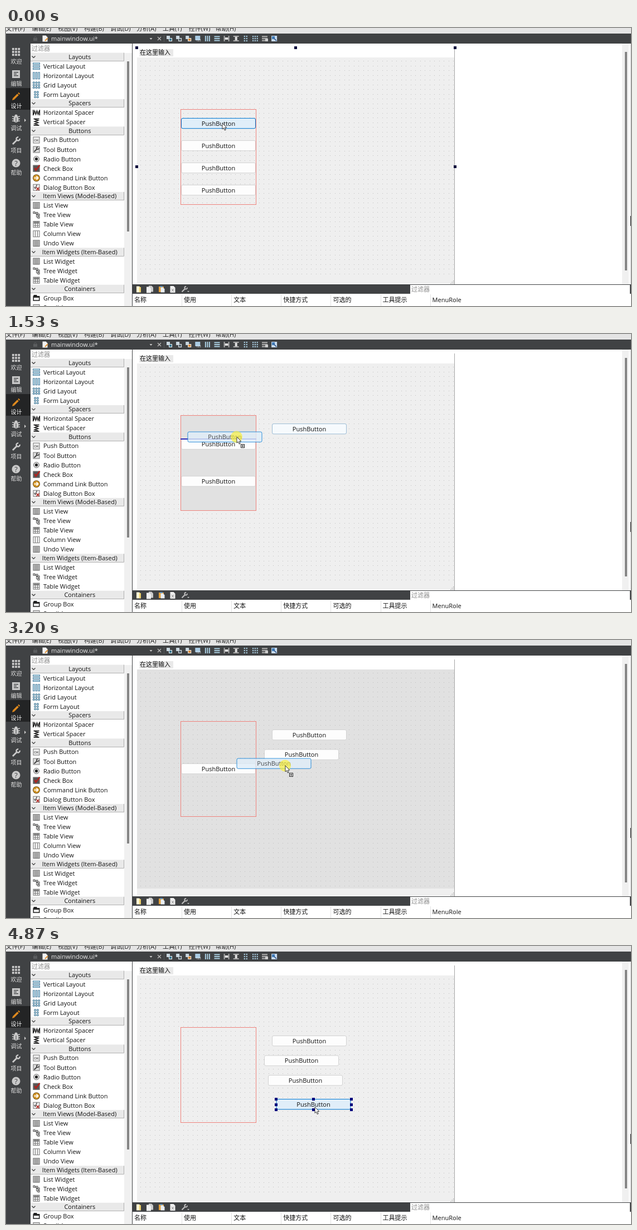
Animation of 1121 by 500 pixels, one loop 5.4 s. Source, as an HTML page with a canvas:

```html
<!DOCTYPE html>
<html lang="zh">
<head>
<meta charset="utf-8">
<title>Form designer</title>
<style>
html, body { margin: 0; width: 100%; height: 100%; overflow: hidden; background: #fff; }
canvas { display: block; }
</style>
</head>
<body>
<canvas id="stage" width="1121" height="500"></canvas>
<script>
const W = 1121, H = 500, LOOP = 5400, STEP = 1000 / 15, STEPS = 81;
const DARK = '#404244', NAVY = '#00007c', BLUE = '#0078d4';
const BTN_W = 133, BTN_H = 18.3;
const box = { x: 313.5, y: 146.5, w: 135, h: 171 };
const stage = document.getElementById('stage').getContext('2d');
let g = stage;

// drawing helpers
function rect(x, y, w, h, color) { g.fillStyle = color; g.fillRect(x, y, w, h); }
function frame(x, y, w, h, color, width = 1) {
  g.strokeStyle = color; g.lineWidth = width; g.strokeRect(x, y, w, h);
}
function disc(x, y, r, color) {
  g.fillStyle = color; g.beginPath(); g.arc(x, y, r, 0, 7); g.fill();
}
function ring(x, y, r, color, width = 1) {
  g.strokeStyle = color; g.lineWidth = width; g.beginPath(); g.arc(x, y, r, 0, 7); g.stroke();
}
function trace(points) {
  g.beginPath();
  for (let i = 0; i < points.length; i += 2) g.lineTo(points[i], points[i + 1]);
}
function line(points, color, width = 1) {
  trace(points); g.strokeStyle = color; g.lineWidth = width; g.stroke();
}
function poly(points, color) { trace(points); g.closePath(); g.fillStyle = color; g.fill(); }
function text(s, x, y, color = '#111', size = 11, align = 'left') {
  g.font = `${size}px "Open Sans", "Noto Sans CJK SC", "Noto Sans CJK JP", sans-serif`;
  g.textAlign = align;
  g.fillStyle = color;
  g.fillText(s, x, y + size * 0.36);
}
function at(x, y, draw) { g.save(); g.translate(x, y); draw(); g.restore(); }
function cells(cols, rows, pitch, size, color) {
  for (let i = 0; i < cols; i++)
    for (let j = 0; j < rows; j++)
      rect((i - (cols - 1) / 2) * pitch - size / 2, (j - (rows - 1) / 2) * pitch - size / 2, size, size, color);
}
function bars(vertical, length, pitch, size, color) {
  for (const i of [-1, 0, 1]) {
    const p = i * pitch - size / 2;
    if (vertical) rect(p, -length / 2, size, length, color);
    else rect(-length / 2, p, length, size, color);
  }
}
function wrench(color, s = 1) {
  line([-5 * s, 5 * s, 2 * s, -2 * s], color, 2.4 * s);
  g.strokeStyle = color; g.lineWidth = 2 * s;
  g.beginPath(); g.arc(3 * s, -3 * s, 2.6 * s, -0.2, 4.9); g.stroke();
}
function page(color, w = 8, h = 11) {
  poly([-w / 2, -h / 2, w / 2 - 3, -h / 2, w / 2, 3 - h / 2, w / 2, h / 2, -w / 2, h / 2], color);
}

// palette icons, drawn around their centre
function plate(fill = '#d8d8d8') { rect(-6, -6, 12, 12, fill); frame(-5.5, -5.5, 11, 11, '#777'); }
function layoutBars(vertical) {
  bars(vertical, 13, 4.6, 3.6, '#4f7f9f');
  bars(vertical, 11, 4.6, 1.8, '#b9dcea');
}
function layoutCells(cols) {
  for (let i = 0; i < cols; i++)
    for (const j of [-1, 0, 1]) {
      const x = (i - (cols - 1) / 2) * 4.6, y = j * 4.4;
      disc(x, y, 2.1, '#53819c'); disc(x, y, 1, '#b9dcea');
    }
}
function spring() {
  rect(-6.5, -5, 1.6, 10, '#111'); rect(5, -5, 1.6, 10, '#111');
  line([-5, 3, -3, -3, -1, 3, 1, -3, 3, 3, 5, -3], '#111', 1.7);
  line([-5, 0, 5, 0], '#555', 2);
}
function rows() {
  plate('#c4c4c4');
  for (let y = -3.5; y < 5; y += 2) line([-4, y, 4, y], '#777', 0.8);
}
function tree() {
  line([-4, -3, 0, -3, 0, 4, 4, 4], '#555'); line([0, 0, 4, 0], '#555');
  for (const [x, y] of [[-4, -4], [1, -3], [4, 0], [4, 4.5]]) {
    rect(x - 2, y - 2, 4, 4, '#444'); rect(x - 1, y - 1, 2, 2, '#eee');
  }
}
function table() {
  plate('#eee'); rect(-5, -5, 10, 3, '#888');
  for (const p of [-2, 2]) { line([p, -5, p, 5], '#777'); line([-5, p, 5, p], '#777'); }
}
const icons = {
  'Vertical Layout': () => layoutBars(false),
  'Horizontal Layout': () => layoutBars(true),
  'Grid Layout': () => layoutCells(3),
  'Form Layout': () => layoutCells(2),
  'Horizontal Spacer': spring,
  'Vertical Spacer': () => { g.rotate(Math.PI / 2); spring(); },
  'Push Button': () => { plate('#eee'); text('OK', 0, 0, '#222', 6, 'center'); },
  'Tool Button': () => { plate('#ddd'); wrench('#444', 0.8); },
  'Radio Button': () => { disc(0, 0, 5.2, '#ddd'); ring(0, 0, 5, '#666'); disc(0, 0, 2.6, '#222'); },
  'Check Box': () => { plate('#555'); line([-3, -1, -1, 3, 6, -6], '#b3221d', 2.4); },
  'Command Link Button': () => {
    disc(0, 0, 6.5, '#6d4a10'); disc(0, 0, 5.5, '#d79a2b');
    line([-4, 0, 3, 0], '#fff', 1.8); line([0, -3, 3, 0, 0, 3], '#fff', 1.8);
  },
  'Dialog Button Box': () => {
    plate('#eee'); line([-4, -1, -2, 2, 1, -5], '#444', 1.3);
    line([0, 0, 5, 5], '#b3221d', 1.6); line([5, 0, 0, 5], '#b3221d', 1.6);
  },
  'List View': rows, 'Tree View': tree, 'Table View': table,
  'Column View': () => { plate('#f4f4f4'); line([-2, -5, -2, 5], '#777'); line([2, -5, 2, 5], '#777'); },
  'Undo View': rows, 'List Widget': rows, 'Tree Widget': tree, 'Table Widget': table,
  'Group Box': () => { rect(-6, -4, 12, 9, '#222'); rect(-5, -6, 6, 3, '#222'); rect(-4.5, -1, 9, 4.5, '#eee'); },
  'Scroll Area': () => plate('#ddd')
};
const groups = {
  'Layouts': 4, 'Spacers': 2, 'Buttons': 6, 'Item Views (Model-Based)': 5,
  'Item Widgets (Item-Based)': 3, 'Containers': 2
};

function drawPalette() {
  rect(44, 28, 182, 472, '#fff');
  text('过滤器', 46, 37, '#8a8a8a');
  rect(212, 45, 14, 455, '#f0f0f0');
  rect(217, 60, 4, 306, '#858585');
  const names = Object.keys(icons);
  let y = 52, next = 0;
  for (const [title, count] of Object.entries(groups)) {
    rect(44, y - 7.5, 167.5, 15, '#e9e9e9');
    rect(44, Math.round(y + 7), 167.5, 1, '#b0b0b0');
    rect(211, y - 7.5, 1, 15, '#b0b0b0');
    line([46.5, y - 1.5, 49.5, y + 1.5, 52.5, y - 1.5], '#333', 1.2);
    text(title, 132.3, y, '#111', 11, 'center');
    y += 16.7;
    for (let i = 0; i < count; i++, y += 17.05) {
      const name = names[next++];
      at(54.5, y, icons[name]);
      text(name, 67, y);
    }
    y -= 1.45;
  }
}

function drawModes() {
  const ink = '#c9c9c9';
  rect(0, 10, 44, 490, DARK);
  rect(0, 108, 44, 39, '#232425');
  const modes = [
    ['欢迎', () => cells(3, 3, 5.2, 3.8, ink)],
    ['编辑', () => {
      rect(-7, -7, 14, 14, ink);
      for (const [v, w] of [[-4, 8], [-1, 5], [2, 8]]) rect(-4, v, w, 1.4, DARK);
    }],
    ['设计', () => {
      line([-4, 4, 3.5, -3.5], '#e08a1e', 3.6); line([4.5, -4.5, 6, -6], '#e08a1e', 3.6);
      poly([-7, 7, -5.5, 2.5, -2.5, 5.5], '#e08a1e');
    }],
    ['调试', () => {
      for (const v of [-3, 1, 5]) line([-7, v - 1, 0, v, 7, v - 1], ink, 1.3);
      g.fillStyle = ink; g.beginPath(); g.ellipse(0, 1, 4.5, 6, 0, 0, 7); g.fill();
      disc(0, -5, 2.6, ink); rect(-0.5, -2, 1, 8, DARK);
    }],
    ['项目', () => wrench(ink, 1.2)],
    ['帮助', () => { disc(0, 0, 7.5, ink); g.font = ''; text('?', 0, 0, DARK, 13, 'center'); }]
  ];
  modes.forEach(([label, icon], i) => {
    at(18, 43 + 40 * i, icon);
    text(label, 18.5, 60 + 40 * i, i === 2 ? '#fff' : '#dedede', 10, 'center');
  });
  poly([33, 163, 36, 166, 33, 169], ink);
}

function drawTopBars() {
  rect(0, 0, W, 10, '#e4e4e4');
  ['文件(F)', '编辑(E)', '视图(V)', '构建(B)', '调试(D)', '分析(A)', '工具(T)', '控件(W)', '帮助(H)']
    .forEach((s, i) => text(s, i * 46.9 - 0.5 + (i === 8 ? 1 : 0), 1.5, '#222'));
  rect(0, 10, W, 18, DARK);
  const ink = '#c8d6df';
  rect(49, 18, 7, 5, '#5a5c5e'); ring(52.5, 17.5, 2, '#5a5c5e');
  at(70, 19, () => { page('#f2f2f2', 9, 11); line([0, 4, 5, -1], '#e2963c', 2); });
  text('mainwindow.ui*', 81, 19, '#ececec');
  poly([257.5, 18, 262.5, 18, 260, 21], '#ccc');
  line([272, 16, 278, 22], '#bbb', 1.2); line([278, 16, 272, 22], '#bbb', 1.2);
  rect(283, 13, 1, 12, '#55585a');
  const overlap = color => () => {
    rect(-5, -5, 6, 6, ink); rect(-1, -1, 6, 6, color); frame(-0.5, -0.5, 5, 5, '#e8eef2');
  };
  const tools = [
    overlap('#3b7891'), overlap('#51606a'), overlap('#d98a3a'),
    () => { rect(-5, -5, 9, 8, '#a9cbe4'); text('123', 1, 3, '#fff', 5, 'center'); },
    () => bars(true, 10, 3.5, 2, '#a9cde0'),
    () => bars(false, 10, 3.5, 2, '#a9cde0'),
    () => { rect(-5, -5, 2, 10, '#aaa'); rect(3, -5, 2, 10, '#aaa'); rect(-3, -2, 6, 4, '#ddd'); },
    () => { rect(-5, -5, 10, 2, '#aaa'); rect(-5, 3, 10, 2, '#aaa'); rect(-2, -3, 4, 6, '#ddd'); },
    () => cells(2, 3, 4, 2.2, '#a9cde0'),
    () => cells(3, 3, 3.8, 2.2, '#a9cde0'),
    () => { bars(false, 10, 3.6, 2.2, '#aaa'); rect(1, 0, 5, 5, '#ccc'); },
    () => { rect(-5, -5, 10, 10, '#c9dcf0'); rect(-4, -4, 5, 5, '#3f79b5'); line([0, 0, 4, 4], '#234a80', 1.5); }
  ];
  tools.forEach((icon, i) => at(293 + i * 17.1, 19, icon));
}

function drawActions() {
  rect(227, 461, 894, 17, DARK);
  rect(725, 462, 394, 16, '#fff');
  text('过滤器', 727, 470, '#8a8a8a');
  at(238, 470, () => { page('#fff6d5'); rect(1, -4, 3, 9, '#f0d36e'); });
  at(258, 470, () => { at(2, -1, () => page('#ccc')); at(-2, 1, () => page('#f0f0f0')); });
  at(279, 470, () => { rect(-5, -5, 9, 10, '#e4a13c'); at(2, 1, () => page('#e8eef4', 7, 9)); rect(-3, -6, 5, 2, '#5d90bd'); });
  at(299, 470, () => { page('#eee', 9, 12); line([-2, -1, 2, 4], '#888'); line([2, -1, -2, 4], '#888'); });
  at(320, 470, () => wrench('#bdbdbd', 0.9));
  poly([325, 473, 329, 473, 327, 475], '#ccc');
  rect(227, 478, 894, 22, '#fff');
  ['名称', '使用', '文本', '快捷方式', '可选的', '工具提示', 'MenuRole'].forEach((s, i) => {
    text(s, 230 + i * 89.1, 489);
    if (i) rect(Math.round(226 + i * 89.1), 479, 1, 21, '#e2e2e2');
  });
}

function drawFormDots() {
  for (let y = 59; y < 447; y += 8.5)
    for (let x = 241; x < 803; x += 8.5) rect(Math.round(x), Math.round(y), 1, 1, '#bdbdbd');
}

function drawWindow() {
  rect(0, 0, W, H, '#fff');
  drawTopBars();
  drawModes();
  drawPalette();
  rect(226, 28, 1, 472, DARK);
  rect(1105, 28, 12, 433, '#f0f0f0');
  rect(1110, 43, 4, 393, '#858585');
  rect(1119, 28, 2, 433, '#e6e6e6');
  rect(1120, 338, 1, 18, '#111');
  rect(235, 53, 569, 407, '#efefef');
  rect(804, 35, 1, 426, '#a6a6a6');
  rect(239, 38, 61, 13, '#e9e9e9');
  text('在这里输入', 240, 44.5);
  for (let i = 0; i < 3; i++)
    for (let j = 0; j <= i; j++) rect(797 + i * 2.5, 459 - j * 2.5, 1.3, 1.3, '#aaa');
  drawActions();
}

function layer(draw) {
  const c = document.createElement('canvas');
  c.width = W; c.height = H;
  g = c.getContext('2d');
  draw();
  g = stage;
  return c;
}
const windowLayer = layer(drawWindow), dotLayer = layer(drawFormDots);

// pointer path: step, x, y
const path = [
  [0, 388, 171], [1, 388, 171], [4, 390, 173], [10, 412, 172], [11, 455, 170], [12, 520, 170],
  [13, 551, 171], [15, 553.5, 172], [19, 553.5, 172], [20, 500, 177], [21, 402, 182], [23, 414, 185],
  [25, 510, 185], [27, 564, 186], [28, 564, 186], [29, 551.5, 206], [31, 545, 210], [32, 500, 235],
  [33, 452, 239], [36, 402, 264], [39, 398, 262], [44, 401, 202], [46, 401, 202], [48, 501, 226],
  [49, 562, 240], [50, 542, 239], [52, 542, 239], [54, 557.5, 245.5], [56, 557.5, 245.5],
  [57, 540, 246], [58, 462, 244], [60, 395, 238], [62, 384, 237], [64, 430, 252], [66, 530, 284],
  [68, 554, 289.5], [STEPS, 554, 289.5]
];
const drags = [
  { press: 4, grab: 5, drop: 17, dx: 76, dy: 10.5, x: 477.5, y: 161.5 },
  { press: 21, grab: 22, drop: 30, dx: 88, dy: 9, x: 463.5, y: 197 },
  { press: 46, grab: 47, drop: 56, dx: 87, dy: 13, x: 470.5, y: 232.5 },
  { press: 61, grab: 62, drop: 73, dx: 69, dy: 14, x: 485, y: 275.5 }
];

function pointer(k) {
  const i = path.findIndex(p => p[0] > k);
  const [k0, x0, y0] = path[i - 1], [k1, x1, y1] = path[i];
  const f = (k - k0) / (k1 - k0);
  return { x: x0 + (x1 - x0) * f, y: y0 + (y1 - y0) * f };
}
function place(i, k, tip) {
  const d = drags[i];
  if (k >= d.drop) return { x: d.x, y: d.y };
  if (k >= d.grab) return { x: tip.x - d.dx, y: tip.y - d.dy, dragged: true };
  const taken = drags.filter(o => k >= o.grab).length, n = 4 - taken;
  return { x: 314.5, y: 222.4 + (i - taken - (n - 1) / 2) * 200 / (n + 1), inLayout: true };
}
function inside(p, x, y, w, h) { return p.x >= x && p.x <= x + w && p.y >= y && p.y <= y + h; }

// hover highlights fade in and out over four steps
const scenes = [];
for (let k = 0; k < STEPS; k++) {
  const tip = pointer(k);
  const buttons = drags.map((d, i) => {
    const b = place(i, k, tip);
    const over = inside(tip, b.x, b.y, BTN_W, BTN_H);
    if (k === 0 || k === d.drop || b.dragged) b.glow = over ? 1 : 0;
    else b.glow = Math.min(1, Math.max(0, scenes[k - 1].buttons[i].glow + (over ? 0.25 : -0.25)));
    return b;
  });
  scenes.push({ tip, buttons });
}

function face(b, fill, border) {
  g.beginPath(); g.roundRect(b.x, b.y, BTN_W, BTN_H, 2.5);
  g.fillStyle = fill; g.fill();
  g.strokeStyle = border; g.lineWidth = 1; g.stroke();
}
function drawButton(b) {
  g.globalAlpha = b.dragged ? 0.8 : 1;
  if (!b.dragged) face(b, '#fdfdfd', '#d2d2d2');
  if (b.glow) {
    g.globalAlpha = b.dragged ? 0.8 : b.glow;
    face(b, '#e0eef9', BLUE);
  }
  g.globalAlpha = b.dragged ? 0.75 : 1;
  text('PushButton', b.x + BTN_W / 2, b.y + 9.3, '#111', 11, 'center');
  g.globalAlpha = 1;
}
function drawHandles(xs, ys, color) {
  xs.forEach((x, i) => ys.forEach((y, j) => {
    if (i !== 1 || j !== 1) rect(Math.round(x - 2), Math.round(y - 2), 5, 5, color);
  }));
}
function drawPointer(tip, pressed, dragging) {
  if (pressed) disc(tip.x - 0.5, tip.y, 10.5, 'rgba(250,240,50,.66)');
  at(tip.x, tip.y, () => {
    const arrow = [0, 0, 0, 11, 2.5, 8.7, 4.3, 13, 6.2, 12.2, 4.4, 8.2, 7.7, 8];
    poly(arrow, '#fff');
    trace(arrow); g.closePath();
    g.strokeStyle = '#222'; g.lineWidth = 0.9; g.stroke();
    if (!dragging) return;
    rect(7, 13, 7, 7, '#fff'); frame(7.5, 13.5, 6, 6, '#222');
    line([8.5, 16.5, 12.5, 16.5], '#222'); line([10.5, 14.5, 10.5, 18.5], '#222');
  });
}

function drawScene(k) {
  const { tip, buttons } = scenes[k];
  const held = buttons.find(b => b.dragged);
  const first = buttons.find(b => b.inLayout);
  const inBox = inside(tip, box.x, box.y, box.w, box.h);
  g.drawImage(windowLayer, 0, 0);
  if (held && !inBox) rect(235, 53, 569, 394, '#e1e1e1');
  g.drawImage(dotLayer, 0, 0);
  if (held && inBox) rect(box.x, box.y, box.w, box.h, '#e1e1e1');
  frame(box.x, box.y, box.w, box.h, '#ee827c');
  buttons.filter(b => !b.dragged).forEach(drawButton);
  if (held && inBox && first) rect(313, Math.round(first.y - 1), 136, 1.6, '#0000b0');
  if (held) drawButton(held);

  if (k < drags[0].drop) drawHandles([234, 519, 805], [35, 249], '#08083c');
  drags.forEach((d, i) => {
    const next = drags[i + 1];
    if (k >= d.drop && (!next || k < next.press))
      drawHandles([d.x - 1, d.x + 66, d.x + BTN_W + 1], [d.y - 1, d.y + 9, d.y + BTN_H + 0.5], NAVY);
  });
  drawPointer(tip, drags.some(d => k >= d.press && k < d.drop), held);
}

function tick() {
  const t = performance.now() % LOOP;
  drawScene(Math.floor((t + 4) / STEP) % STEPS);
  requestAnimationFrame(tick);
}
tick();
</script>
</body>
</html>
```
